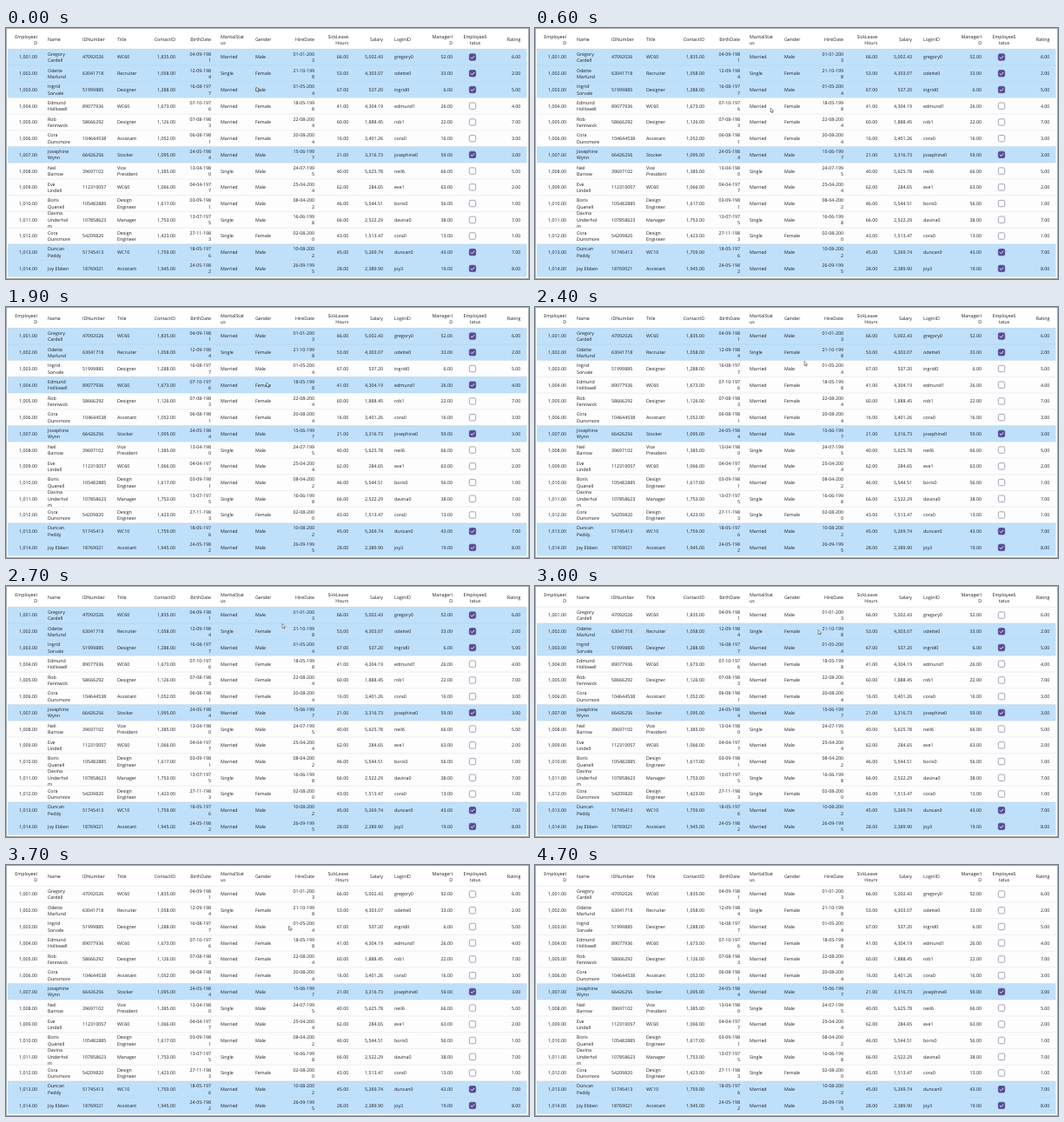
Write an HTML page that moves like this. It is 602 by 289 pixels and loops after 4800 ms.

```html
<!DOCTYPE html>
<html lang="en">
<head>
<meta charset="utf-8">
<title>Employee grid</title>
<style>
  html, body { margin: 0; height: 100%; overflow: hidden; background: #fff; }
  svg { display: block; width: 100vw; height: 100vh; }
  text { font: 5.3px "Open Sans", "Noto Sans", sans-serif; fill: #1c1b1f; text-rendering: geometricPrecision; }
  .row { fill: #fefdfe; }
  .rule { stroke: #000; stroke-opacity: .11; stroke-width: .6; }
  .box { fill: #fdfcff; stroke: #918fa6; stroke-width: .8; }
  .tick { fill: none; stroke: none; stroke-width: .9; }
  .on .row { fill: #bfe0fb; }
  .on .box { fill: #594a94; stroke: #594a94; }
  .on .tick { stroke: #fff; }
</style>
</head>
<body>
<svg id="stage" viewBox="0 0 602 289"></svg>
<script>
const LOOP = 4800, STEP = 100, TOP = 24.2, PITCH = 18.72, LINE = 7.3;
const stage = document.getElementById('stage');

// header ("/" breaks a line), anchor x, alignment
const columns = [
  ['EmployeeI/D', 36, 'end'], ['Name', 48, 'start'], ['IDNumber', 88, 'start'],
  ['Title', 128, 'start'], ['ContactID', 195, 'end'], ['BirthDate', 236, 'end'],
  ['MaritalStat/us', 247, 'start'], ['Gender', 287, 'start'], ['HireDate', 355, 'end'],
  ['SickLeave/Hours', 394.3, 'end'], ['Salary', 434, 'end'], ['LoginID', 447, 'start'],
  ['ManagerI/D', 514, 'end'], ['EmployeeS/tatus', 540, 'middle'], ['Rating', 592.4, 'end']
];

// name, id, title, contact, birth, marital, gender, hire, sick leave, salary, login digit, manager, rating
const people = `
Gregory/Cardell|47092026|WC60|1835|04-09-1981|M|M|01-01-2003|66|5002.43|0|52|6
Odette/Marlund|63041718|Recruiter|1058|12-09-1984|S|F|21-10-1998|53|4303.07|0|33|2
Ingrid/Sorvale|51999885|Designer|1288|16-08-1977|M|M|01-05-2004|67|537.20|0|6|5
Edmund/Hollowell|89077936|WC60|1673|07-10-1976|M|F|18-05-1998|41|4304.19|1|26|4
Rob/Fennwick|58666292|Designer|1126|07-08-1983|M|F|22-08-2004|60|1888.45|1|22|7
Cora/Dunsmore|104644538|Assistant|1052|06-08-1981|M|F|20-08-2004|16|3401.26|0|16|3
Josephine/Wynn|66426256|Stocker|1095|24-05-1984|M|M|15-06-1997|21|3316.73|0|59|3
Neil/Barrow|39697102|Vice/President|1385|13-04-1980|S|M|24-07-1995|40|5625.78|6|66|5
Eve/Lindell|112310057|WC60|1066|04-04-1977|M|M|25-04-2004|62|284.65|1|63|2
Boris/Quenell|105482885|Design/Engineer|1617|03-09-1981|M|M|08-04-2002|46|5544.51|0|56|1
Davina/Underhol/m|107858623|Manager|1753|13-07-1975|S|M|16-06-1998|66|2522.29|0|38|7
Cora/Dunsmore|54209820|Design/Engineer|1423|27-11-1983|S|F|02-08-2000|43|1513.47|0|13|1
Duncan/Peddy|51745413|WC10|1759|18-05-1976|M|M|10-08-2002|45|5269.74|0|43|7
Joy Ebben|18769021|Assistant|1945|24-05-1982|M|M|26-09-1995|28|2389.90|3|19|8
`.trim().split('\n').map(line => line.split('|'));

// row numbers selected at the start, then [time, row] clicks that toggle
const selected = [1, 2, 3, 7, 13, 14];
const clicks = [[900, 4], [1500, 3], [2000, 4], [2500, 3], [2800, 1], [3200, 2], [3700, 3]];

// pointer path: time, x, y
const path = [
  [0, 288, 68], [200, 288, 68], [600, 271, 92], [900, 271, 92], [1400, 281, 70.5],
  [1500, 281, 70.5], [1900, 300, 87], [2000, 300, 87], [2400, 310, 62.5], [2500, 310, 62.5],
  [2800, 322, 34], [3000, 326, 50.5], [3200, 326, 50.5], [3500, 325.5, 70],
  [3700, 325.5, 70], [4200, 340, -10], [LOOP, 340, -10]
];

const money = n => (+n).toLocaleString('en-US', { minimumFractionDigits: 2 });
const wrapDate = d => d.slice(0, 9) + '/' + d.slice(9);

function cell(text, column, middle) {
  const [, x, anchor] = columns[column], lines = text.split('/');
  return lines.map((line, i) => {
    const y = middle + 1.9 + (i - (lines.length - 1) / 2) * LINE;
    return `<text x="${x}" y="${y}" text-anchor="${anchor}">${line}</text>`;
  }).join('');
}

function row(person, i) {
  const [name, id, title, contact, birth, marital, gender, hire, sick, salary, digit, manager, rating] = person;
  const top = TOP + i * PITCH, middle = top + PITCH / 2;
  const login = name.split(/[ /]/)[0].toLowerCase() + digit;
  const values = [
    money(1001 + i), name, id, title, money(contact), wrapDate(birth),
    marital === 'M' ? 'Married' : 'Single', gender === 'M' ? 'Male' : 'Female',
    wrapDate(hire), money(sick), money(salary), login, money(manager), '', money(rating)
  ];
  return `<g class="line">
    <rect class="row" x="2" y="${top}" width="597.5" height="${PITCH}"/>
    <path class="rule" d="M2 ${top}h597.5"/>
    ${values.map((v, c) => cell(v, c, middle)).join('')}
    <rect class="box" x="533.3" y="${middle - 3.7}" width="7.4" height="7.4" rx="1.6"/>
    <path class="tick" d="M535 ${middle + .1}l1.4 1.5 2.7-3"/>
  </g>`;
}

stage.innerHTML = columns.map((c, i) => cell(c[0], i, 13.3)).join('') +
  people.map(row).join('') +
  `<path class="rule" d="M2 ${TOP + people.length * PITCH}h597.5"/>
  <rect x=".5" y=".5" width="601" height="288" fill="none" stroke="#a9a9a9"/>
  <path id="pointer" d="M0 0V5l1.2-1 .8 1.8.9-.4-.8-1.7h1.6z" fill="#fff" stroke="#4a4a4a" stroke-width=".6"/>`;

const lines = [...stage.querySelectorAll('.line')];
const pointer = document.getElementById('pointer');

function draw(now) {
  const t = Math.floor(now % LOOP / STEP) * STEP;
  lines.forEach((line, i) => {
    const toggles = clicks.filter(([at, n]) => n === i + 1 && at <= t).length;
    line.classList.toggle('on', selected.includes(i + 1) !== (toggles % 2 === 1));
  });
  const next = path.findIndex(p => p[0] > t);
  const [t0, x0, y0] = path[next - 1], [t1, x1, y1] = path[next];
  const k = (t - t0) / (t1 - t0);
  pointer.setAttribute('transform', `translate(${x0 + (x1 - x0) * k} ${y0 + (y1 - y0) * k})`);
}

const start = performance.now();
function tick() {
  draw(performance.now() - start);
  requestAnimationFrame(tick);
}
tick();
</script>
</body>
</html>
```
